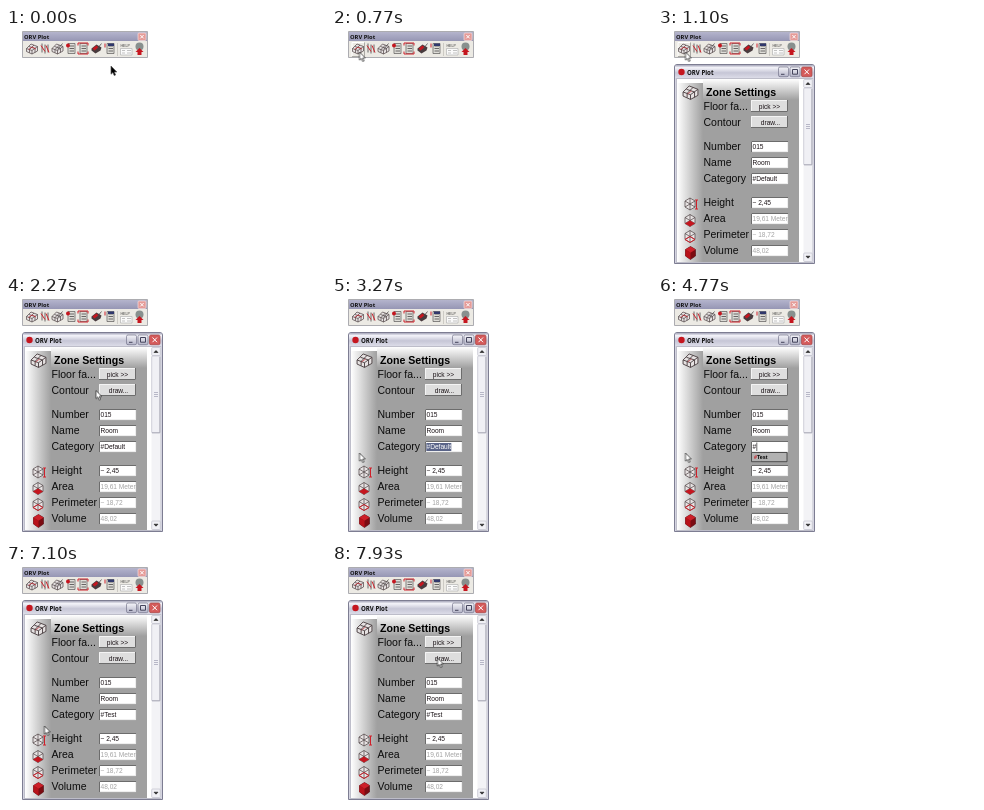
These frames come from a looping animation (320x240 px, 8000 ms). An HTML page:

```html
<!DOCTYPE html>
<html lang="en">
<head>
<meta charset="utf-8">
<title>Zone settings</title>
<style>
html, body { margin: 0; width: 100%; height: 100%; overflow: hidden; background: #fff; }
svg { display: block; width: 100vw; height: 100vh; }
text { font-family: "Liberation Sans", Arial, sans-serif; white-space: pre; }
.title { font: bold 5.8px "Noto Sans", sans-serif; fill: #111; }
.head { font-size: 10.6px; font-weight: bold; }
.label { font-size: 10.5px; fill: #0c0c0c; }
.value { font-size: 6.6px; fill: #1c1418; }
.dim { fill: #a4a4a4; }
.mid { text-anchor: middle; }
.wire { fill: #e6e2e2; stroke: #4c4143; stroke-width: .7; stroke-linejoin: round; }
.red { fill: #c5161f; }
.redline { fill: none; stroke: #d0202a; stroke-width: 1; }
.dark { fill: none; stroke: #4a4748; stroke-width: .8; }
.lit { fill: none; stroke: #f4f4f4; }
.shade { fill: none; stroke: #6c6c6c; }

.at { opacity: 0; animation: 8s step-end infinite; }
#hover { animation-name: hover; }
#win { animation-name: win; }
#form { animation-name: form; }
#preset { animation-name: preset; }
#select { animation-name: select; }
#hash { animation-name: hash; }
#caret1 { animation-name: caret1; }
#test { animation-name: test; }
#caret2 { animation-name: caret2; }
#cursor { animation: move 8s step-end infinite, tint 8s step-end infinite; }

@keyframes hover { 0% { opacity: 0 } 7.5% { opacity: 1 } 17.875% { opacity: 0 } }
@keyframes win { 0% { opacity: 0 } 11.625% { opacity: 1 } 100% { opacity: 1 } }
@keyframes form { 0% { opacity: 0 } 13.75% { opacity: 1 } 100% { opacity: 1 } }
@keyframes preset { 0% { opacity: 1 } 59.625% { opacity: 0 } }
@keyframes select {
  0% { opacity: 0; clip-path: inset(0 0 0 55%) }
  36.625% { opacity: 1; clip-path: inset(0 0 0 55%) }
  38.75% { opacity: 1; clip-path: inset(0) }
  59.625% { opacity: 0 }
}
@keyframes hash { 0% { opacity: 0 } 59.625% { opacity: 1 } 76.25% { opacity: 0 } }
@keyframes caret1 { 0% { opacity: 0 } 59.625% { opacity: 1 } 65.875% { opacity: 0 } 72.125% { opacity: 1 } 76.25% { opacity: 0 } }
@keyframes test { 0% { opacity: 0 } 76.25% { opacity: 1 } 100% { opacity: 1 } }
@keyframes caret2 { 0% { opacity: 0 } 76.25% { opacity: 1 } 82.5% { opacity: 0 } }
@keyframes tint { 0% { fill: #000; stroke: #555 } 5.375% { fill: #fff; stroke: #222 } 100% { fill: #fff; stroke: #222 } }
@keyframes move {
  0% { transform: translate(105px, 38px) }
  1.25% { transform: translate(98px, 37px) }
  3.375% { transform: translate(77px, 33px) }
  5.375% { transform: translate(50px, 28px) }
  7.5% { transform: translate(33px, 25px) }
  9.625% { transform: translate(27.5px, 24px) }
  17.875% { transform: translate(29px, 27px) }
  20% { transform: translate(38px, 38px) }
  22.125% { transform: translate(53px, 56px) }
  24.125% { transform: translate(70px, 75px) }
  26.25% { transform: translate(83px, 88px) }
  28.375% { transform: translate(90px, 94.5px) }
  30.375% { transform: translate(95px, 112px) }
  32.5% { transform: translate(109px, 137px) }
  34.625% { transform: translate(117px, 149px) }
  36.625% { transform: translate(104px, 151px) }
  38.75% { transform: translate(56px, 155px) }
  40.875% { transform: translate(27.5px, 157px) }
  88.75% { transform: translate(38.5px, 162px) }
  90.875% { transform: translate(57px, 142px) }
  92.875% { transform: translate(78px, 119px) }
  95% { transform: translate(95px, 102px) }
  97.125% { transform: translate(103px, 95px) }
  99.125%, 100% { transform: translate(105.5px, 94px) }
}
</style>
</head>
<body>
<svg viewBox="0 0 320 240" preserveAspectRatio="none">
<defs>
  <linearGradient id="bar" x2="0" y2="1"><stop stop-color="#b4b4cc"/><stop offset="1" stop-color="#9696b4"/></linearGradient>
  <linearGradient id="silver" x2="0" y2="1"><stop stop-color="#a6a6ba"/><stop offset=".2" stop-color="#f4f4fa"/><stop offset=".6" stop-color="#c6c6d6"/><stop offset="1" stop-color="#dcdce8"/></linearGradient>
  <linearGradient id="button" x2="0" y2="1"><stop stop-color="#f6f6fa"/><stop offset="1" stop-color="#b4b4c8"/></linearGradient>
  <linearGradient id="side"><stop stop-color="#fff"/><stop offset="1" stop-color="#a0a0a0"/></linearGradient>
  <linearGradient id="fade" x2="0" y2="1"><stop stop-color="#fff"/><stop offset="1" stop-color="#a0a0a0"/></linearGradient>
  <clipPath id="view"><path d="M19 51H155V234H19Z"/></clipPath>
  <g id="cube">
    <path class="wire" d="M0-6 5-3V3L0 6-5 3V-3Z"/>
    <path class="wire" style="fill:none" d="M-5-3 0 0 5-3M0 0V6M-5 3 0 0 5 3M0 0V-6"/>
  </g>
  <g id="house">
    <path class="wire" d="M-5.500 0-1-4.500 5.500-2V2.500L0 5.500-5.500 3Z"/>
    <path class="wire" style="fill:none" d="M-5.500 0 0 2 5.500-2M0 2V5.500M-2.500 1 2-3.500M-3-2 3 0V4M-2.500 1V4.200"/>
  </g>
  <g id="sheet">
    <path d="M-3-5H4V5H-3Z" fill="#deddd8" stroke="#5b5858" stroke-width=".7"/>
    <path class="dark" d="M-1.500-2.500H3M-1.500 0H3M-1.500 2.500H3"/>
  </g>
  <g id="field">
    <path d="M93 0H130V11H93Z" fill="#fff"/>
    <path class="shade" d="M93.500 11V.5H130"/>
    <path d="M94 10.700H129.700V1" fill="none" stroke="#dcdcdc" stroke-width=".6"/>
  </g>
  <g id="push">
    <path d="M93 0H130V12H93Z" fill="#dedede"/>
    <path class="lit" d="M93.500 12V.5H130"/>
    <path class="shade" d="M93 11.500H129.500V0"/>
  </g>
</defs>

<!-- toolbar -->
<path d="M16.500 3.500H141.500V29.500H16.500Z" fill="#eceae4" stroke="#a4a4aa" stroke-width=".9"/>
<path d="M17 4H141V13H17Z" fill="url(#bar)"/>
<text class="title" x="18" y="11.300">ORV Plot</text>
<rect x="132" y="5" width="8" height="7.500" rx="1" fill="#e59b98" stroke="#f5dede" stroke-width=".7"/>
<path d="m134.300 7 3.400 3.400m0-3.400-3.400 3.400" stroke="#fff"/>
<g id="hover" class="at" fill="none"><path d="M20 28V14.500H32" stroke="#fff"/><path d="M32.500 14.500V28.500H20" stroke="#9a9894" stroke-width=".8"/></g>
<g transform="translate(26 20.500)"><use href="#house"/><path class="redline" stroke-opacity=".7" d="M-3.500 1 0-1.500 4 .5"/></g>
<g transform="translate(39 20.500)">
  <path class="dark" d="M-3-5V4M0-4V5M3-4V4"/><path class="redline" d="M-4-3 0 3M1-3 4 4"/>
</g>
<g transform="translate(51.500 20.500)"><use href="#house"/><path class="dark" d="m0 1 5-6"/></g>
<g transform="translate(65 20.500)"><use href="#sheet"/><circle class="red" cx="-3" cy="-3" r="2"/></g>
<g transform="translate(77 20.500)"><use href="#sheet"/><path class="redline" d="M-5-3V-5.500H5V-3M-5 3V5.500H5V3"/></g>
<g transform="translate(90.500 20.500)">
  <path d="M-5 0 0-4 5-1 4 2-1 5-5 2Z" fill="#483b3e"/><path class="red" d="M-4 0 0-3 2-1-2 2Z"/><path class="dark" d="m1 0 4-5"/>
</g>
<g transform="translate(104 20.500)">
  <use href="#sheet"/><path d="M-2-5H4V-2.500H-2Z" fill="#30386c"/><path class="redline" d="M-5-5V-1"/>
</g>
<path d="M111.500 15V28" stroke="#c4c2bc" stroke-width=".8"/>
<path d="M114.500 20.500H126V27H114.500Z" fill="#fafafa" stroke="#aaa" stroke-width=".6"/>
<path d="M116 22.500H119M116 25H119M121 22.500H125M121 25H125" stroke="#aaa" stroke-width=".7"/>
<text x="114.500" y="18.500" font-size="3.600" fill="#333">HELP</text>
<circle cx="133.500" cy="18.500" r="4" fill="#88908e"/>
<path class="red" d="m133.500 20 4 4h-2v3h-4v-3h-2Z"/>

<!-- dialog -->
<g id="win" class="at">
  <path d="M16.500 235.500V39Q16.500 36.500 19 36.500H154Q156.500 36.500 156.500 39V235.500Z" fill="#d4d4e0" stroke="#7d7d92"/>
  <path d="M17 50V39Q17 37 19 37H154Q156 37 156 39V50Z" fill="url(#silver)"/>
  <path d="M18.500 50.500H154.500V234.500H18.500Z" fill="#fff" stroke="#a0a0b0" stroke-width=".6"/>
  <circle class="red" cx="23.500" cy="44" r="3.200"/>
  <text class="title" x="29" y="46.500" style="font-size:6.100px">ORV Plot</text>
  <g fill="url(#button)" stroke="#74748c" stroke-width=".7">
    <rect x="120.500" y="39" width="10" height="9.700" rx="1.500"/>
    <rect x="132" y="39" width="10" height="9.700" rx="1.500"/>
    <rect x="143.500" y="39" width="10.500" height="9.700" rx="1.500" fill="#d45a5a" stroke="#a84848"/>
  </g>
  <path d="M123 46.300h3.500M134.500 41.500h5v4.700h-5Z" fill="none" stroke="#44445c"/>
  <path d="m146.500 41.500 4.500 4.700m0-4.700-4.500 4.700" stroke="#fff"/>
</g>

<g id="form" class="at" clip-path="url(#view)">
  <path d="M19 51H141V234H19Z" fill="#a0a0a0"/>
  <path d="M19 55H45V234H19Z" fill="url(#side)"/>
  <path d="M19 51H45V55H19Z" fill="#fff"/>
  <path d="M45 51H141V72H45Z" fill="url(#fade)"/>
  <path d="M145.500 51H154.500V234H145.500Z" fill="#f3f3f6"/>
  <g fill="#f0f0f5" stroke="#c0c0cc" stroke-width=".7">
    <rect x="145.700" y="51.500" width="8.600" height="8" rx="1"/>
    <rect x="145.700" y="60" width="8.600" height="77" rx="1"/>
    <rect x="145.700" y="225" width="8.600" height="8.500" rx="1"/>
  </g>
  <path d="M146 136.700H153.800V61" fill="none" stroke="#a4a4b2" stroke-width=".8"/>
  <path d="m148 56.500 2-2 2 2ZM148 228.200l2 2 2-2Z" fill="#222" stroke="#222" stroke-width=".6"/>
  <path d="M148 96.500h4M148 98.500h4M148 100.500h4" stroke="#a0a0b4" stroke-width=".7"/>

  <g transform="translate(32.500 64)"><use href="#house" transform="scale(1.350)"/><path class="redline" stroke-opacity=".6" d="M-3 2 1-1"/></g>
  <use href="#cube" x="32" y="176"/><path class="redline" d="M38.500 172V181M37 172H40M37 181H40"/>
  <use href="#cube" x="32" y="192.500"/><path class="red" d="m32 192.500 5 3-5 3-5-3Z"/>
  <use href="#cube" x="32" y="208.500"/><path class="redline" d="m32 208.500 5 3-5 3-5-3Z"/>
  <path d="m32.500 218.500 5 3V228l-5 3.500-5-3.500V221.500Z" fill="#7c0c12" stroke="#500a10" stroke-width=".6"/>
  <path d="m27.500 221.500 5 3.200V231.500L27.500 228Z" fill="#b8121a"/>
  <path d="m32.500 218.500 5 3-5 3.200-5-3.200Z" fill="#cc2029"/>

  <text class="head" x="48" y="67.500">Zone Settings</text>
  <g class="label">
    <text x="45.500" y="81.800">Floor fa...</text>
    <text x="45.500" y="97.800">Contour</text>
    <text x="45.500" y="122">Number</text>
    <text x="45.500" y="138">Name</text>
    <text x="45.500" y="154">Category</text>
    <text x="45.500" y="178">Height</text>
    <text x="45.500" y="194">Area</text>
    <text x="45.500" y="210">Perimeter</text>
    <text x="45.500" y="226">Volume</text>
  </g>

  <use href="#push" y="72"/>
  <use href="#push" y="88"/>
  <text class="value mid" x="111.500" y="80.500">pick &gt;&gt;</text>
  <text class="value mid" x="112.500" y="96.500">draw...</text>

  <use href="#field" y="113"/>
  <use href="#field" y="129"/>
  <use href="#field" y="145"/>
  <use href="#field" y="169"/>
  <use href="#field" y="185"/>
  <use href="#field" y="201"/>
  <use href="#field" y="217"/>
  <text class="value" x="94.500" y="121">015</text>
  <text class="value" x="94.500" y="137">Room</text>
  <text class="value" x="94.500" y="177">~ 2,45</text>
  <text class="value dim" x="94.500" y="193">19,61 Meter</text>
  <text class="value dim" x="94.500" y="209">~ 18,72</text>
  <text class="value dim" x="94.500" y="225">48,02</text>

  <text id="preset" class="value at" x="94.500" y="153">#Default</text>
  <g id="select" class="at">
    <path d="M94.300 147H119.300V155H94.300Z" fill="#5a6488"/>
    <text class="value" x="94.500" y="153" style="fill:#fff">#Default</text>
  </g>
  <g id="hash" class="at">
    <text class="value" x="94.500" y="153">#</text>
    <path d="M93.500 156.500H129V165.700H93.500Z" fill="#b2b2b2" stroke="#444" stroke-width=".9"/>
    <text x="96" y="163" font-size="5.300" font-weight="bold"><tspan fill="#c5161f">#</tspan>Test</text>
  </g>
  <path id="caret1" class="at" d="M98.800 146.500V155" stroke="#000" stroke-width=".6"/>
  <text id="test" class="value at" x="94.500" y="153">#Test</text>
  <path id="caret2" class="at" d="M111 146.500V155" stroke="#000" stroke-width=".6"/>
</g>

<path id="cursor" d="M0 0V8.200L1.900 6.500 3.200 9.500 4.600 8.900 3.300 6H5.800Z" stroke-width=".7"/>
</svg>
</body>
</html>
```
